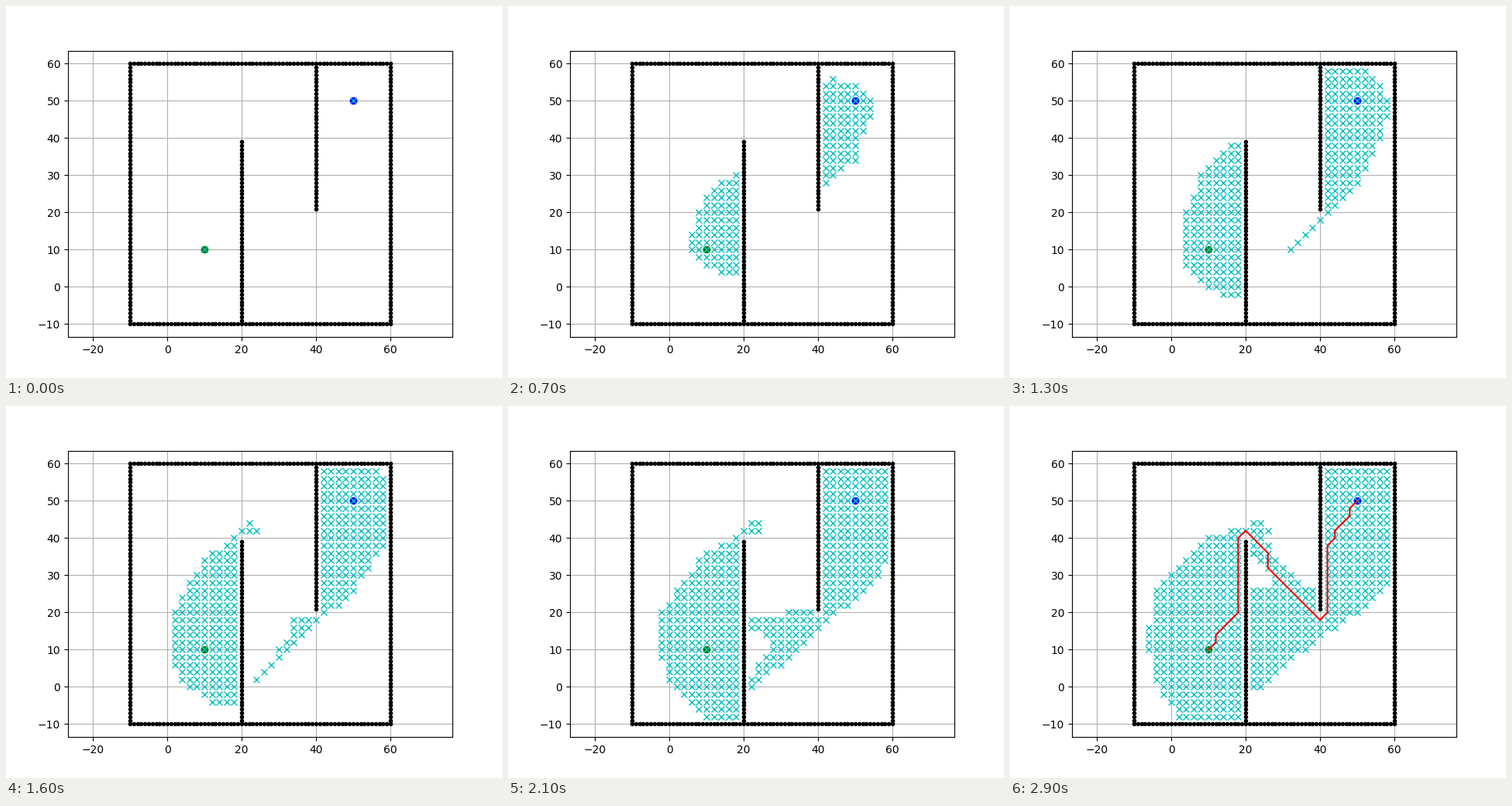
Write a matplotlib script that moves like this. It is 640 by 480 pixels and loops after 3200 ms.

```python
import math

import matplotlib.pyplot as plt
from matplotlib.animation import FuncAnimation

LOW, HIGH, STEP = -10, 60, 2
START, GOAL = (10, 10), (50, 50)
FRAMES, INTERVAL = 32, 100
PATH_FRAME = 29
PAIRS_PER_FRAME = 10

SQ2 = math.sqrt(2)
MOVES = [(1, 0, 1), (0, 1, 1), (-1, 0, 1), (0, -1, 1),
         (-1, -1, SQ2), (-1, 1, SQ2), (1, -1, SQ2), (1, 1, SQ2)]


def make_walls():
    side = range(LOW, HIGH + 1)
    walls = [(i, LOW) for i in side] + [(i, HIGH) for i in side]
    walls += [(LOW, i) for i in side] + [(HIGH, i) for i in side]
    walls += [(20, i) for i in range(LOW, 40)]
    walls += [(40, i) for i in range(21, HIGH + 1)]
    return list(dict.fromkeys(walls))


WALLS = make_walls()
WALL_SET = set(WALLS)


def to_cell(point):
    return tuple((v - LOW) // STEP for v in point)


def to_point(cell):
    return tuple(v * STEP + LOW for v in cell)


def is_free(cell):
    x, y = to_point(cell)
    if not (LOW <= x < HIGH and LOW <= y < HIGH):
        return False
    near = [(x, y), (x + 1, y), (x - 1, y), (x, y + 1), (x, y - 1)]
    return not any(p in WALL_SET for p in near)


class Side:
    """One half of the two-way A* search."""

    def __init__(self, cell):
        self.current = cell
        self.open = {cell: (0.0, None)}
        self.closed = {}

    def pick(self, aim):
        def total(cell):
            return self.open[cell][0] + math.hypot(aim[0] - cell[0],
                                                   aim[1] - cell[1])
        self.current = min(self.open, key=total)

    def expand(self):
        cell = self.current
        self.closed[cell] = self.open.pop(cell)
        cost = self.closed[cell][0]
        for dx, dy, length in MOVES:
            child = (cell[0] + dx, cell[1] + dy)
            if child in self.closed or not is_free(child):
                continue
            if child not in self.open or self.open[child][0] > cost + length:
                self.open[child] = (cost + length, cell)

    def trace(self):
        """Points from the current cell back to this side's root."""
        cell, parent = self.current, self.open[self.current][1]
        points = [to_point(cell)]
        while parent is not None:
            points.append(to_point(parent))
            parent = self.closed[parent][1]
        return points


def search():
    a, b = Side(to_cell(START)), Side(to_cell(GOAL))
    visited = []
    while a.open and b.open:
        a.pick(b.current)
        b.pick(a.current)
        visited += [to_point(a.current), to_point(b.current)]
        if a.current == b.current:
            return visited, a.trace()[::-1] + b.trace()
        a.expand()
        b.expand()
    return visited, []


visited, path = search()

fig, ax = plt.subplots(figsize=(6.4, 4.8), dpi=100)
ax.plot(*zip(*WALLS), ".k")
ax.plot(*START, "og")
ax.plot(*GOAL, "ob")
marks, = ax.plot([], [], "xc")
route, = ax.plot([], [], "-r")
ax.grid(True)

# Equal scale on both axes, with a 5 % margin in height
half_w = 38.5 * 496 / 369.6
ax.set_xlim(25 - half_w, 25 + half_w)
ax.set_ylim(25 - 38.5, 25 + 38.5)


def draw(frame):
    done = frame >= PATH_FRAME
    count = len(visited) if done else 2 * (PAIRS_PER_FRAME * frame + 1)
    marks.set_data(*zip(*visited[:count]))
    if done and path:
        route.set_data(*zip(*path))
    else:
        route.set_data([], [])
    return marks, route


anim = FuncAnimation(fig, draw, frames=FRAMES, interval=INTERVAL,
                     init_func=lambda: draw(0), repeat=True, repeat_delay=0)
plt.show()
```
